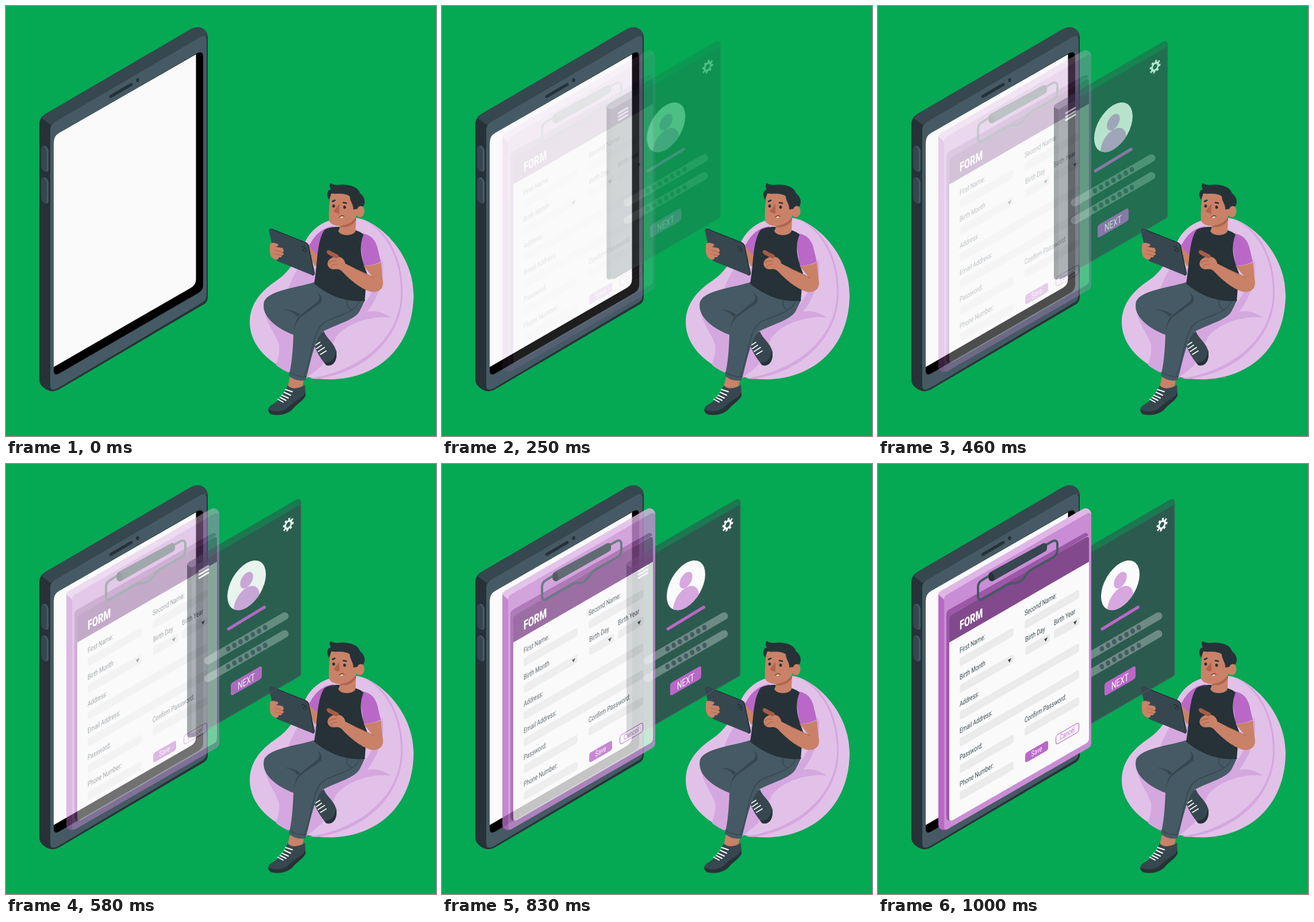
An HTML page for the animation above (1.04 s loop, 748 px wide and 748 px high).

```html
<!DOCTYPE html>
<html lang="en">
<head>
<meta charset="utf-8">
<title>Form and login panels</title>
<style>
html, body { margin: 0; width: 100%; height: 100%; overflow: hidden; background: #05a853; }
svg { display: block; width: 100vw; height: 100vh; }
text { font-family: Roboto, "Liberation Sans", sans-serif; }
.line { fill: none; stroke-linecap: round; stroke-linejoin: round; }
.enter { animation: 1000ms both paused; }
#login { animation-name: slide; animation-timing-function: cubic-bezier(.36, -.01, .5, 1.38); }
#form { animation-name: fade; animation-timing-function: ease-in; }
@keyframes slide { from { opacity: 0; transform: translateX(-45px); } to { opacity: 1; transform: none; } }
@keyframes fade { from { opacity: 0; } to { opacity: 1; } }
</style>
</head>
<body>
<svg viewBox="0 0 748 748">
  <defs><clipPath id="face"><circle r="38.7"/></clipPath></defs>

  <g id="device">
    <path fill="#263238" d="M58 207Q58 193 70 187L322 40Q334 34 343 40Q351 45 351 55V506Q351 515 344 519L92 667Q82 673 72 668Q58 661 58 650Z"/>
    <path fill="#37474f" d="M62 195Q65 190 70 187L322 40Q334 34 343 40Q350 44 351 53L348 54Q345 50 338 54L86 201Q80 204 78 207Z"/>
    <path fill="#455a64" d="M77 215Q77 206 86 201L338 54Q349 48 349 60V503Q349 512 341 516L90 665Q77 672 77 660Z"/>
    <g id="key">
      <path fill="#37474f" d="M61 250Q61 243 67 243Q74 245 74 255V283Q74 290 68 288Q61 286 61 277Z"/>
      <path fill="#455a64" d="M67 243Q74 245 74 255V283Q74 289 69 288Q71 286 71 280V255Q71 247 65 244Z"/>
    </g>
    <use href="#key" y="55"/>
    <path d="M83 238Q83 226 92 221L331 83Q343 76 343 89V485Q343 494 335 499L93 639Q83 645 83 634Z"/>
    <path fill="#fafafa" d="M83 238Q83 226 92 221L330.500 84V475Q330.500 485 322 490L83 628Z"/>
    <path class="line" stroke="#263238" stroke-width="5" d="M182 157.500L218 136.500"/>
    <ellipse fill="#263238" cx="229" cy="129" rx="2.700" ry="3.500"/>
  </g>

  <g id="bag">
    <path fill="#e1c1e8" d="M424 550C424 515 448 493 470 478C500 458 508 430 522 407C538 378 568 366 606 368C645 371 709 428 709 502C709 590 650 648 565 649.500C490 650 424 606 424 550Z"/>
    <g fill="#d5a7df">
      <path d="M449 526C455 560 470 570 475 590C477 608 470 618 470 625Q482 634 495 639L505 570Z"/>
      <path d="M530 565L622 520C630 508 640 495 642 480L654 440C662 470 645 512 628 532C645 529 658 534 669 542C636 538 592 552 574 576L550 625L522 648Z"/>
      <path d="M508 456C500 470 494 482 490 494L542 484V456Z"/>
      <path d="M622 371C666 390 690 440 690 498C690 575 628 637 540 649L528 648C620 634 687 575 687 498C687 440 662 394 622 371Z"/>
    </g>
  </g>

  <g id="man">
    <path fill="#37474f" d="M553 566C558 580 575 588 575 606C574 622 566 628 557 624C548 615 541 603 537 592L541 572Z"/>
    <path fill="#263238" d="M574 598C578 615 570 628 557 625L553 620C567 622 573 612 574 598Z"/>
    <path class="line" stroke="#fff" stroke-width="1.800" d="M538 590L546 585M540 596L549 590M543 601L554 594M547 606L557 600"/>

    <path fill="#c98267" d="M494 645L518 650L515 666Q502 672 490 662Z"/>
    <path fill="#37474f" d="M490 660C498 669 512 664 520 659L521 675C516 685 505 690 498 699C489 711 470 713 461 709C454 706 456 697 462 694C476 686 484 676 490 660Z"/>
    <path fill="#263238" d="M456 701C466 708 485 706 494 695C504 685 515 683 521 672V678C516 688 506 692 499 701C489 712 470 713 461 710Q456 707 456 701Z"/>
    <path class="line" stroke="#fff" stroke-width="2" d="M486 667L498 671M484 672L495 677M480 677L491 682M477 681L487 686M473 684L482 689"/>

    <path fill="#455a64" d="M538 480C508 490 458 494 449 514C444 534 460 556 500 572C499 600 497 625 492 643Q504 654 521 651C528 630 533 590 550 567C580 551 610 546 617 527L625 511Z"/>
    <path fill="#37474f" d="M540 496Q549 506 542 514L512 538Q502 546 500 572Q502 548 516 539L548 516Q552 505 540 496ZM484 528Q502 529 512 537L507 541Q500 531 484 528Z"/>
    <path class="line" stroke="#37474f" stroke-width="1.500" d="M614 515C606 534 580 537 556 549C532 563 535 605 519 645M593 512Q592 526 601 528M493 637Q506 646 522 645"/>

    <path fill="#c98267" d="M528 414L548 436L538 454Q530 440 524 425Z"/>
    <path fill="#ba68c8" d="M527 418C536 400 548 386 570 383L552 420L546 438Z"/>
    <path fill="#ba68c8" d="M614 395C634 396 642 406 646 420L652 445Q638 452 622 452Z"/>
    <path fill="#263238" d="M553 391Q558 385 578 384L608 390Q618 393 622 398C612 420 620 445 628 465L624 513C590 516 560 503 536 483C542 450 540 412 553 391Z"/>
    <path fill="#c98267" d="M581 374L609 364L608 391C606 400 582 402 578 391Q582 387 581 374Z"/>
    <path fill="#b0644e" d="M581 382Q598 380 609 366V372Q601 386 581 385Z"/>

    <path fill="#c98267" d="M565 326C562 345 561 360 562 374Q565 381 580 383Q602 380 609 366L613 345L600 322Z"/>
    <ellipse fill="#c98267" cx="615.500" cy="357" rx="8" ry="10.500"/>
    <path fill="#263238" d="M562 337C556 327 560 320 565 319Q561 312 565 308Q571 313 585 310.500C602 311 613 316 616 326C625 332 626 344 621 349Q614 346 611 353L604 354C605 345 598 340 598 331C588 324 573 328 566 326Z"/>
    <ellipse fill="#263238" cx="570" cy="348" rx="2.400" ry="2.700"/>
    <ellipse fill="#263238" cx="589" cy="350" rx="2.400" ry="2.700"/>
    <path class="line" stroke="#263238" stroke-width="2.600" d="M568 340L572 338M587 342L592 343"/>
    <path fill="#b0644e" d="M580 344L570 357Q574 361 580 361Z"/>
    <path class="line" stroke="#7a3b2e" stroke-width="1.300" d="M580 367Q584 363 588 366"/>
    <path fill="#fff" d="M581 367L587 366L584 369Z"/>

    <path fill="#37474f" d="M457 390Q458 386 463 388L521 411Q526 413 527 417L537 464Q537 470 532 468L475 445Q470 443 469 439Z"/>
    <path class="line" stroke="#263238" stroke-width="1.500" d="M462 388L520 411Q525 413 526 417L536 465Q536 468 533 468"/>
    <path fill="#263238" d="M514 417Q521 417 523 426Q521 430 517 426Z"/>
    <circle fill="#455a64" cx="517.500" cy="421" r="1.300"/>
    <circle fill="#455a64" cx="519.500" cy="425" r="1.300"/>
    <path fill="#c98267" d="M459 418Q458 411 466 412L473 414Q475 418 469 419L481 421Q485 426 481 429Q486 432 480 434Q480 438 474 437Q475 442 468 441Q460 438 459 428Z"/>
    <path class="line" stroke="#b0644e" stroke-width="1" d="M468 425L480 428M468 431L479 434"/>

    <path fill="#c98267" d="M622 452Q638 452 652 446L656 482C656 494 646 499 634 497C615 491 596 474 584 461C576 455 572 460 565 457C557 453 558 443 565 439Q574 433 584 438Q590 443 590 448L638 472Z"/>
    <path fill="#a95b45" d="M558 426Q561 423 566 427L578 433Q581 438 574 439L562 433Q557 430 558 426Z"/>
    <path class="line" stroke="#b0644e" stroke-width="1.200" d="M562 447Q568 442 575 444M565 454Q570 448 576 449M606 457Q626 465 640 473"/>
  </g>

  <g id="login" class="enter">
    <path fill="#263238" opacity=".8" d="M318 176L326 180V475Q318 478 318 470Z"/>
    <path fill="#37474f" opacity=".5" d="M318 176Q318 172 322 170L508 62Q514 59 516 65V70L326 180Z"/>
    <path fill="#37474f" opacity=".8" d="M326 180L516 70V364Q516 368 512 370L332 474Q326 477 326 472Z"/>
    <path class="line" stroke="#455a64" stroke-width="1.500" opacity=".8" d="M515.500 66V364Q515.500 368 512 369.500L332 473.500"/>
    <g transform="matrix(.866 -.5 0 1 494 105.500)" fill="none" stroke="#fff">
      <circle r="6.200" stroke-width="3.600"/>
      <circle r="9.200" stroke-width="3.600" pathLength="16" stroke-dasharray="1"/>
    </g>
    <path class="line" stroke="#fff" stroke-width="2.800" d="M339 186.500L355 177M339 192.500L355 183M339 198.500L355 189"/>
    <g transform="matrix(.866 -.5 0 1 421.500 211)">
      <circle r="38.700" fill="#fafafa"/>
      <g fill="#d7a7df" clip-path="url(#face)">
        <circle cy="-9" r="13"/>
        <path d="M-26 40V30A26 26 0 0 1 26 30V40Z"/>
      </g>
    </g>
    <path class="line" stroke="#ba68c8" stroke-width="5" d="M390 287L452.500 249"/>
    <g id="dots"><path class="line" stroke="#fff" stroke-opacity=".3" stroke-width="13" d="M354 342L488 264.500"/></g>
    <use href="#dots" y="31"/>
    <g transform="matrix(1 -.577 0 1 394 381.500)">
      <rect width="54" height="22.500" rx="4" fill="#ba68c8"/>
      <text transform="translate(12 18.500) scale(.66 1)" font-size="18" fill="#fff">NEXT</text>
    </g>
  </g>

  <g id="form" class="enter">
    <path fill="#ba68c8" d="M105 226L115 229L124 634Q115 639 109 635Q105 633 105 627Z"/>
    <path fill="#dfb6e6" d="M105 227Q105 223 109 221L355 79Q362 75 367 79Q371 82 371 88L115 236Z"/>
    <path fill="#c98dd5" d="M115 236Q115 230 120 227L362 87Q371 82 371 92V485Q371 491 366 494L123 634Q115 639 115 630Z"/>
    <path fill="#9b58a7" d="M119 262Q119 256 124 253L358 121Q364 118 366 124L124 270V621Q119 619 119 614Z"/>
    <path fill="#824a8c" d="M124 271Q124 265 129 262L361 128Q367 125 367 131V170L124 311Z"/>
    <path fill="#fafafa" d="M124 310.500L367 170V477Q367 483 362 486L131 619Q124 623 124 615Z"/>
    <path class="line" stroke="#455a64" stroke-width="4" d="M194 194L181 202Q174 206 174 214V230Q174 239 182 235L227 209C234 205 238 210 246 205C258 199 256 189 268 183L305 162Q312 158 312 150V140Q312 131 304 134L290 142"/>
    <path fill="#37474f" d="M192 194Q193 189 197 187L287 138Q293 136 294 143V147Q294 150 291 152L201 203Q193 206 192 198Z"/>
    <ellipse fill="#263238" cx="197.500" cy="196.500" rx="5" ry="7.500" transform="rotate(-15 197.500 196.500)"/>
    <g id="sheet" transform="matrix(1 -.577 0 1 142 0)">
      <rect x="114" y="569" width="40" height="17" rx="4" fill="#ba68c8"/>
      <rect x="167.500" y="569" width="40" height="16" rx="4" fill="none" stroke="#ba68c8" stroke-width="1.200"/>
    </g>
  </g>
</svg>
<script>
const make = (parent, tag, attrs, text = "") => {
  const el = document.createElementNS("http://www.w3.org/2000/svg", tag);
  for (const key in attrs) el.setAttribute(key, attrs[key]);
  el.textContent = text;
  document.getElementById(parent).append(el);
};
const label = (text, x, y, fill = "#37474f", size = 13, weight = 400) =>
  make("sheet", "text", { transform: `translate(${x} ${y}) scale(.66 1)`, fill, "font-size": size, "font-weight": weight }, text);

// label, column, row, field width, has arrow
const fields = [
  ["First Name:", 0, 0, 94], ["Second Name:", 113, 0, 95],
  ["Birth Month", 0, 1, 94, true], ["Birth Day", 114, 1, 43, true], ["Birth Year", 164, 1, 44, true],
  ["Address:", 0, 2, 208], ["Email Address:", 0, 3, 208],
  ["Password:", 0, 4, 94], ["Confirm Password:", 113, 4, 95], ["Phone Number:", 0, 5, 94]
];
for (const [text, x, row, width, arrow] of fields) {
  const y = 338 + row * 46.5;
  make("sheet", "rect", { x, y, width, height: 15, rx: 4, fill: "#ebebeb" });
  label(text, x, y - 8.5);
  if (arrow) make("sheet", "path", { d: `M${x + width - 10} ${y + 5}h6l-3 6z`, fill: "#37474f" });
}
label("FORM", 0, 289, "#fff", 22, 900);
label("Save", 124.5, 581.5, "#fff", 13.5);
label("Cancel", 174, 581, "#ba68c8");

for (let i = 0; i < 7; i++)
  make("dots", "ellipse", { cx: 389.5 + i * 10.7, cy: 321.5 - i * 6.17, rx: 3.9, ry: 4.6, fill: "#455a64" });

// The motion advances in 25 held steps per loop; the first one rests empty.
const LOOP = 1040, STEPS = 25, HOLD = LOOP / STEPS, LEAD = 36;
const motions = document.getAnimations();
function draw(now) {
  const step = Math.min(STEPS - 1, Math.floor((now % LOOP + 5) / HOLD));
  for (const m of motions) m.currentTime = step && step * HOLD + LEAD;
  requestAnimationFrame(draw);
}
draw(performance.now());
</script>
</body>
</html>
```
